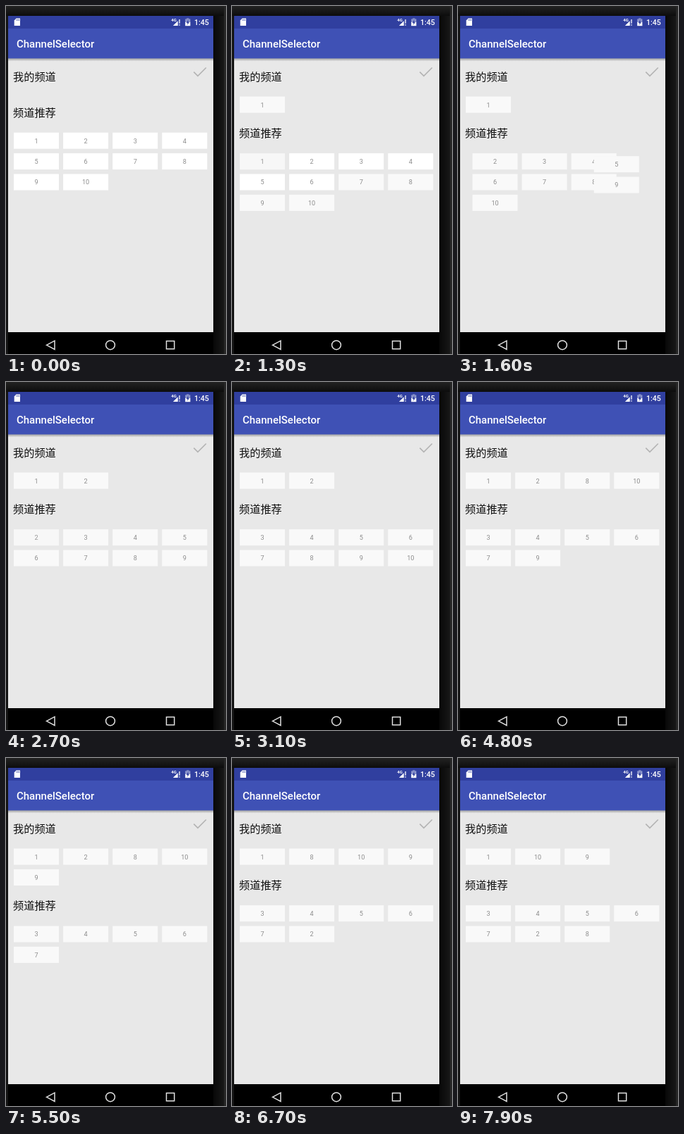
Write an HTML page with a canvas that moves like this. It is 312 by 494 pixels and loops after 8 s.

```html
<!DOCTYPE html>
<html lang="zh">
<head>
<meta charset="utf-8">
<title>ChannelSelector</title>
<style>
html, body { margin: 0; width: 100%; height: 100%; overflow: hidden; background: #111; }
canvas { display: block; width: 312px; height: 494px; }
</style>
</head>
<body>
<canvas id="stage"></canvas>
<script>
const W = 312, H = 494, LOOP = 8000, STEP = 100;
const canvas = document.getElementById('stage');
const ctx = canvas.getContext('2d');
const dpr = window.devicePixelRatio || 1;
canvas.width = W * dpr;
canvas.height = H * dpr;

const ROBOTO = 'Roboto, "Noto Sans", sans-serif';
const CJK = '"Noto Sans CJK SC", "Noto Sans CJK", "Noto Sans CJK JP", sans-serif';
const CELL = { x: 11, w: 64, h: 23, dx: 70.1, dy: 29.4, cols: 4 };
const FADE = 120, MOVE = 250;

// [time, channel, index of the list it leaves]: 0 = mine, 1 = suggested
const taps = [
  [1290, 1, 1], [2690, 2, 1], [3790, 8, 1], [4590, 10, 1],
  [5375, 9, 1], [6290, 2, 0], [7490, 8, 0]
];

const clamp = v => Math.min(1, Math.max(0, v));
const ease = p => (1 - Math.cos(Math.PI * p)) / 2;
const rows = list => Math.ceil(list.length / CELL.cols);

function rect(x, y, w, h, fill) {
  ctx.fillStyle = fill;
  ctx.fillRect(x, y, w, h);
}

function path(points, closed) {
  ctx.beginPath();
  points.forEach(([x, y]) => ctx.lineTo(x, y));
  if (closed) ctx.closePath();
}

function shape(points, fill) {
  path(points, true);
  ctx.fillStyle = fill;
  ctx.fill();
}

function line(points, color, width, closed) {
  path(points, closed);
  ctx.strokeStyle = color;
  ctx.lineWidth = width;
  ctx.stroke();
}

function text(str, x, y, font, color, align = 'left') {
  ctx.font = font;
  ctx.fillStyle = color;
  ctx.textAlign = align;
  ctx.fillText(str, x, y);
}

function gradient(x0, y0, x1, y1, ...colors) {
  const g = ctx.createLinearGradient(x0, y0, x1, y1);
  colors.forEach((c, i) => g.addColorStop(i / (colors.length - 1), c));
  return g;
}

function drawPhone() {
  rect(0, 0, W, H, '#141414');
  rect(0, 0, W, 14, gradient(0, 0, 0, 14, '#222', '#181818', '#0c0c0c'));
  rect(294, 14, 15, H, gradient(294, 0, 309, 0, '#080808', '#171717'));
  rect(309, 0, 3, H, '#262626');
  rect(3, 14, 291, 449, '#e8e8e8');
  rect(3, 463, 291, 31, '#000');

  line([[57.5, 481.3], [69, 475.2], [69, 487.4]], '#e0e0e0', 1.5, true);
  ctx.beginPath();
  ctx.arc(148, 481.3, 6.4, 0, 7);
  ctx.stroke();
  ctx.strokeRect(227.5, 475.6, 11.2, 11.2);
}

function drawBars() {
  rect(3, 14, 291, 18, '#303f9f');
  rect(3, 32, 291, 42.5, '#3f51b5');
  rect(3, 74.5, 291, 4, gradient(0, 74.5, 0, 78.5, 'rgba(0,0,0,.3)', 'rgba(0,0,0,0)'));
  text('ChannelSelector', 15, 59.3, '500 15px ' + ROBOTO, '#fff');

  // memory card
  shape([[14.5, 17.5], [20, 17.5], [20, 28], [11.7, 28], [11.7, 20.5]], '#fff');
  [14.6, 16.4, 18.2].forEach(x => rect(x, 18.8, 0.8, 2, '#303f9f'));

  // signal
  shape([[247, 18], [247, 28], [237, 28]], '#8d96cc');
  shape([[243.5, 21.5], [243.5, 28], [237, 28]], '#fff');
  rect(244.2, 18, 3, 10, '#303f9f');
  rect(245.4, 19, 1.3, 5.8, '#fff');
  rect(245.4, 26.2, 1.3, 1.5, '#fff');
  text('4G', 234.3, 22.3, '700 6px ' + ROBOTO, '#fff');

  // battery
  rect(256.2, 17.3, 3.2, 1.4, '#8d96cc');
  rect(254.2, 18.4, 7.2, 4.4, '#8d96cc');
  rect(254.2, 22.8, 7.2, 5.4, '#fff');
  shape([[258.4, 19.3], [255.8, 23.9], [257.4, 23.9], [257.4, 27],
         [260, 22.4], [258.4, 22.4]], '#303f9f');

  text('1:45', 287.8, 27, '500 10.6px ' + ROBOTO, '#fff', 'right');
  line([[266.3, 93.6], [272, 99.3], [283.8, 87.5]], '#b4b4b4', 1.7);
}

// Lists at a given time, plus the latest removal
function stateAt(t) {
  const lists = [[], Array.from({ length: 10 }, (_, i) => i + 1)];
  let gone = null;
  for (const [time, item, from] of taps) {
    if (time > t) break;
    const slot = lists[from].indexOf(item);
    lists[from].splice(slot, 1);
    lists[1 - from].push(item);
    gone = { from, item, slot, age: t - time };
  }
  return { lists, gone };
}

const slotPos = (i, top) => [
  CELL.x + (i % CELL.cols) * CELL.dx,
  top + Math.floor(i / CELL.cols) * CELL.dy
];

function drawCell(item, [x, y], fill) {
  rect(x, y, CELL.w, CELL.h, fill);
  text(item, x + CELL.w / 2, y + 14.9, '9.1px ' + ROBOTO, '#8c8c8c', 'center');
}

function drawGrid(list, top, gone, fillOf) {
  ctx.save();
  ctx.beginPath();
  ctx.rect(3, top - 3, 291, rows(list) * CELL.dy);
  ctx.clip();
  const p = gone ? ease(clamp((gone.age - FADE) / MOVE)) : 1;
  list.forEach((item, i) => {
    let pos = slotPos(i, top);
    if (gone && i >= gone.slot) {
      const old = slotPos(i + 1, top);
      pos = pos.map((v, k) => old[k] + (v - old[k]) * p);
    }
    drawCell(item, pos, fillOf(item));
  });
  if (gone && gone.age < FADE) {
    ctx.globalAlpha = 1 - gone.age / FADE;
    drawCell(gone.item, slotPos(gone.slot, top), fillOf(gone.item));
  }
  ctx.restore();
}

function draw(t) {
  ctx.setTransform(dpr, 0, 0, dpr, 0, 0);
  drawPhone();
  drawBars();

  const { lists, gone } = stateAt(t);
  const shift = rows(lists[0]) * CELL.dy;
  const tops = [128.6, 179.7 + shift];
  const fillOf = n =>
    t < 1300 || (t < 1400 && n > 1 && n < 7) ? '#fff' : '#f9f9f9';

  text('我的频道', 10, 105.8, '15.2px ' + CJK, '#111');
  text('频道推荐', 10, 156.6 + shift, '15.2px ' + CJK, '#111');
  lists.forEach((list, k) =>
    drawGrid(list, tops[k], gone && gone.from === k ? gone : null, fillOf));
}

const start = performance.now();
function tick() {
  const t = (performance.now() - start) % LOOP;
  draw(Math.floor(t / STEP) * STEP);
  requestAnimationFrame(tick);
}
tick();
</script>
</body>
</html>
```
